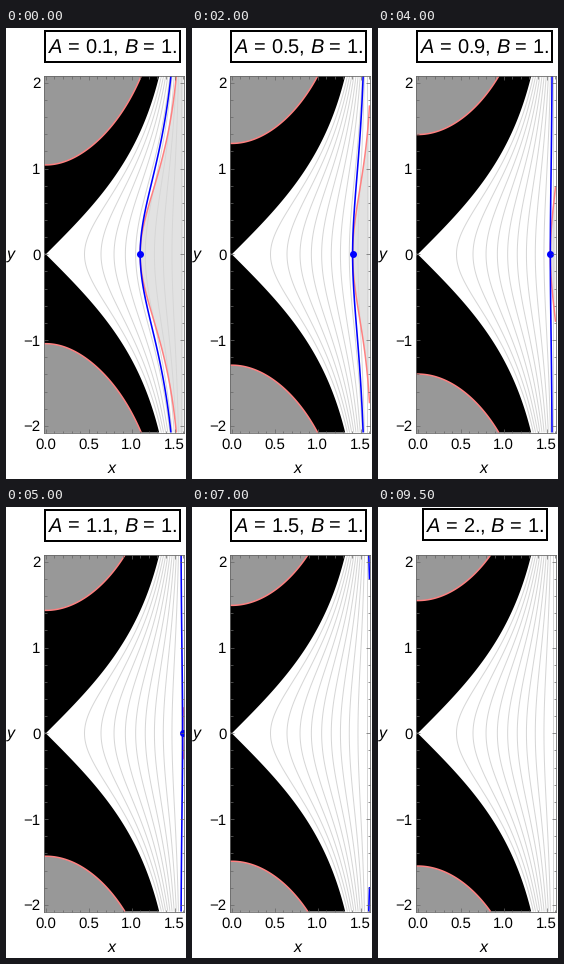
Recreate the animation shown at these times as a matplotlib script. Size 180 by 451 pixels, loop 10000 ms.

```python
import numpy as np
import matplotlib.pyplot as plt
from matplotlib.animation import FuncAnimation
from matplotlib.patches import Rectangle
from matplotlib.ticker import MultipleLocator

W, H, DPI = 180, 451, 64
PT = 72 / DPI                     # points per pixel
LEFT, RIGHT, TOP, BOTTOM = 37.5, 177.5, 48, 404.5
X0, Y0, UNIT = 39.8, 226.3, 85.8  # pixel position of the origin, pixels per unit

plt.rcParams.update({
    "font.family": "Liberation Sans",
    "mathtext.fontset": "custom",
    "mathtext.rm": "Liberation Sans",
    "mathtext.it": "Liberation Sans:italic",
    "text.hinting": "none",
    "text.hinting_factor": 1,
})

fig = plt.figure(figsize=(W / DPI, H / DPI), dpi=DPI, facecolor="white")

page = fig.add_axes([0, 0, 1, 1])
page.set(xlim=(0, W), ylim=(H, 0))
page.axis("off")

ax = fig.add_axes([LEFT / W, 1 - BOTTOM / H, (RIGHT - LEFT) / W, (BOTTOM - TOP) / H])
x_range = (LEFT - X0) / UNIT, (RIGHT - X0) / UNIT
y_range = (Y0 - BOTTOM) / UNIT, (Y0 - TOP) / UNIT
ax.set(xlim=x_range, ylim=y_range)

# Known harmonic solution T = 1 - B cos(x) cosh(y) with B = 1
x, y = np.meshgrid(np.linspace(*x_range, 282), np.linspace(*y_range, 714))
T = 1 - np.cos(x) * np.cosh(y)
slope = np.hypot(np.sin(x) * np.cosh(y), np.cos(x) * np.sinh(y))


def fill(field, low, high, color, **style):
    return ax.contourf(x, y, field, [low, high], colors=[color], antialiased=True, **style)


def curve(field, levels, color, width, zorder):
    return ax.contour(x, y, field, levels, colors=[color], linewidths=width * PT,
                      linestyles="solid", zorder=zorder)


def style_axes():
    ax.set_axisbelow(False)
    ax.xaxis.set_major_locator(MultipleLocator(0.5))
    ax.xaxis.set_minor_locator(MultipleLocator(0.1))
    ax.yaxis.set_major_locator(MultipleLocator(1))
    ax.yaxis.set_minor_locator(MultipleLocator(0.2))
    for which, length in (("major", 4), ("minor", 2.5)):
        ax.tick_params(which=which, direction="in", top=True, right=True, color="0.4",
                       length=length * PT, width=0.7 * PT, labelsize=15 * PT)
    ax.tick_params(axis="x", pad=5 * PT)
    ax.tick_params(axis="y", pad=3 * PT)
    for spine in ax.spines.values():
        spine.set(color="0.4", linewidth=0.8 * PT)
    page.text(106, 445, "x", size=16 * PT, style="italic", ha="center", va="baseline")
    page.text(4.5, 231, "y", size=16 * PT, style="italic", ha="center", va="baseline")


style_axes()
fill(T, T.min() - 1, 0, "black", zorder=1)
curve(T, np.arange(1, 11) / 10, "0.84", 1, 1.1)

dot, = ax.plot([], [], "o", color="blue", ms=7 * PT, mew=0, zorder=2.3)
title = page.text(106.5, 25.5, "", size=20 * PT, ha="center", va="baseline")
border = page.add_patch(Rectangle((0, 0), 1, 31, fill=False, lw=2 * PT, joinstyle="miter"))
moving = []


def critical_temperature(a):
    """Solve T^4 = A |grad T| on the line y = 0."""
    t = 1.0
    for _ in range(60):
        t = (a * np.sqrt(t * (2 - t))) ** 0.25
    return t


def update(i):
    while moving:
        moving.pop().remove()
    a = (i + 1) / 10
    whole = (i + 1) % 10 == 0

    flux = T ** 4 - a * slope
    moving.append(fill(flux, 0, flux.max() + 1, "0.843", alpha=0.71, zorder=2))
    moving.append(curve(flux, [0], (1, 0.5, 0.5), 1.5, 2.1))

    t = critical_temperature(a)
    if t < T.max():
        moving.append(curve(T, [t], "blue", 1.6, 2.2))
    dot.set_data([np.arccos(1 - t)], [0])

    value = f"{a:.0f}." if whole else f"{a:.1f}"
    title.set_text(f"$A$ = {value}, $B$ = 1.")
    half = 62 if whole else 67.5
    border.set_bounds(106.5 - half, 2 if whole else 3, 2 * half, 31)
    return [dot, title, border]


anim = FuncAnimation(fig, update, frames=20, interval=500, repeat=True,
                     repeat_delay=0, init_func=lambda: update(0))
plt.show()
```
